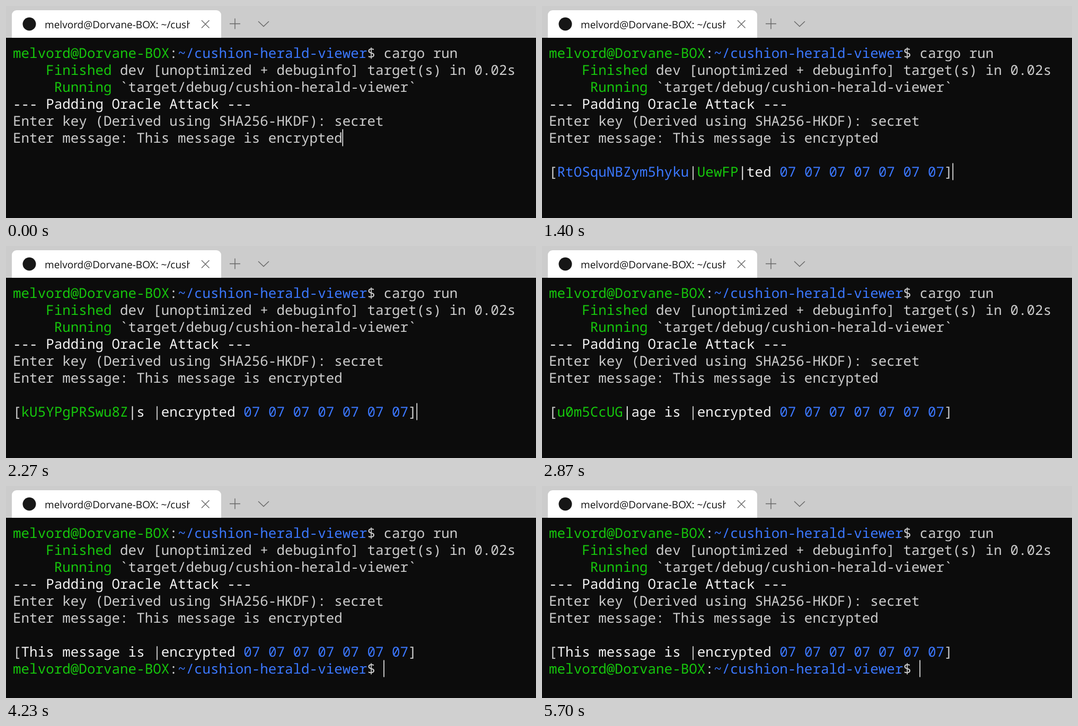
Recreate the animation shown at these times as an HTML page. Size 1000 by 400 pixels, loop 5730 ms.

```html
<!DOCTYPE html>
<html lang="en">
<head>
<meta charset="utf-8">
<title>Terminal</title>
<style>
  html, body { margin: 0; width: 100%; height: 100%; overflow: hidden; background: #0c0c0c; }
  svg { display: block; width: 100vw; height: 100vh; }
  text { white-space: pre; text-rendering: geometricPrecision; }
  #term text {
    font: 500 25.92px "Noto Sans Mono", "DejaVu Sans Mono", monospace;
    font-variant-ligatures: none;
    fill: #ccc;
  }
  #tab { font: 19px "Open Sans", "Noto Sans", sans-serif; fill: #111; }
  .icon { fill: none; stroke: #666; stroke-width: 1.4; }
  #term .g { fill: #16c60c; }
  #term .b { fill: #3b78ff; }
  #term .w { fill: #f2f2f2; }
</style>
</head>
<body>
<svg viewBox="0 0 1000 400">
  <defs><clipPath id="clip"><rect x="70" y="10" width="277" height="48"/></clipPath></defs>
  <rect width="1000" height="400" fill="#0c0c0c"/>
  <rect width="1000" height="60" fill="#ccc"/>
  <path d="M11 60V17a9 9 0 0 1 9-9H397a9 9 0 0 1 9 9V60Z" fill="#fff"/>
  <circle cx="44" cy="34" r="12.5" fill="#161616"/>
  <g clip-path="url(#clip)"><text id="tab" x="73" y="42"></text></g>
  <path class="icon" d="M369 27l14.500 14.500M383.500 27l-14.500 14.500"/>
  <path class="icon" d="M422 33.500h20M432 23.500v20M476 29l10 9.500 10-9.500"/>
  <g id="term"></g>
  <rect id="cursor" width="1.500" height="32" fill="#fff"/>
</svg>
<script>
const LOOP = 5730, ENTER = 970, START = 1030, BLINK = 530;
const LEFT = 13, TOP = 72, COL = 15.552, ROW = 32;
const USER = 'melvord@Dorvane-BOX', DIR = 'cushion-herald-viewer';
const MESSAGE = 'This message is encrypted', BLOCK = 16, BYTES = 32;
const ALPHABET = 'ABCDEFGHIJKLMNOPQRSTUVWXYZabcdefghijklmnopqrstuvwxyz0123456789';

const term = document.getElementById('term');
const cursor = document.getElementById('cursor');
document.getElementById('tab').textContent = `${USER}: ~/${DIR}`;

const span = (text, cls = '') => `<tspan class="${cls}">${text}</tspan>`;

function addLine(row, html = '') {
  const line = document.createElementNS('http://www.w3.org/2000/svg', 'text');
  line.setAttribute('x', LEFT);
  line.setAttribute('y', TOP + 26 + row * ROW);
  line.innerHTML = html;
  term.append(line);
  return line;
}

const prompt = span(USER, 'g') + ':' + span('~/' + DIR, 'b') + '$ ';
[
  prompt + 'cargo run',
  span('    Finished', 'g') + ' dev [unoptimized + debuginfo] target(s) in 0.02s',
  span('     Running', 'g') + ` \`target/debug/${DIR}\``,
  span('--- Padding Oracle Attack ---', 'w'),
  'Enter key (Derived using SHA256-HKDF): secret',
  'Enter message: ' + MESSAGE
].forEach((html, row) => addLine(row, html));
const attack = addLine(7);
const lastPrompt = addLine(8, prompt);

// Bytes are solved from the end; a letter takes time in proportion to its code.
const solvedAt = [];
for (let i = BYTES - 1, time = START; i >= 0; i--) {
  const rate = i >= 18 ? 1.235 : 0.744;
  time += i < MESSAGE.length ? MESSAGE.charCodeAt(i) / rate : 10;
  solvedAt.push(time);
}
const END = solvedAt[BYTES - 1];

function noise(length, seed) {
  let out = '';
  for (let i = 0; i < length; i++) {
    const x = Math.sin(seed * 12.9898 + i * 78.233) * 43758.5453;
    out += ALPHABET[Math.floor((x - Math.floor(x)) * ALPHABET.length)];
  }
  return out;
}

function known(from, to) {
  const pads = Math.max(0, to - Math.max(from, MESSAGE.length));
  return span(MESSAGE.slice(from, to), 'w') + span(' 07'.repeat(pads), 'b');
}

function block(from, pos, tick) {
  const to = from + BLOCK;
  if (pos >= to) return span(noise(BLOCK, tick), 'b');
  if (pos < from) return known(from, to);
  return span(noise(pos - from, tick), 'g') + span('|', 'w') + known(pos + 1, to);
}

function attackLine(t) {
  const solved = solvedAt.filter(time => time <= t).length;
  const pos = BYTES - 1 - solved, tick = Math.floor(t / 30);
  const pads = Math.min(solved, BYTES - MESSAGE.length);
  return {
    html: '[' + block(0, pos, tick) + '|' + block(BLOCK, pos, tick + 500) + ']',
    width: BYTES + 3 + 2 * pads
  };
}

function draw(t) {
  let row = 5, col = 15 + MESSAGE.length, html = '';
  if (t >= ENTER) [row, col] = [7, 0];
  if (t >= START) ({ html, width: col } = attackLine(t));
  if (t >= END) [row, col] = [8, 45];
  attack.innerHTML = html;
  lastPrompt.style.display = t >= END ? '' : 'none';
  cursor.setAttribute('x', LEFT - 0.5 + col * COL);
  cursor.setAttribute('y', TOP + row * ROW + 0.5);
  cursor.style.display = (t + 90) % (2 * BLINK) < BLINK ? '' : 'none';
}

const begin = performance.now();
function frame() {
  draw((performance.now() - begin) % LOOP);
  requestAnimationFrame(frame);
}
frame();
</script>
</body>
</html>
```
